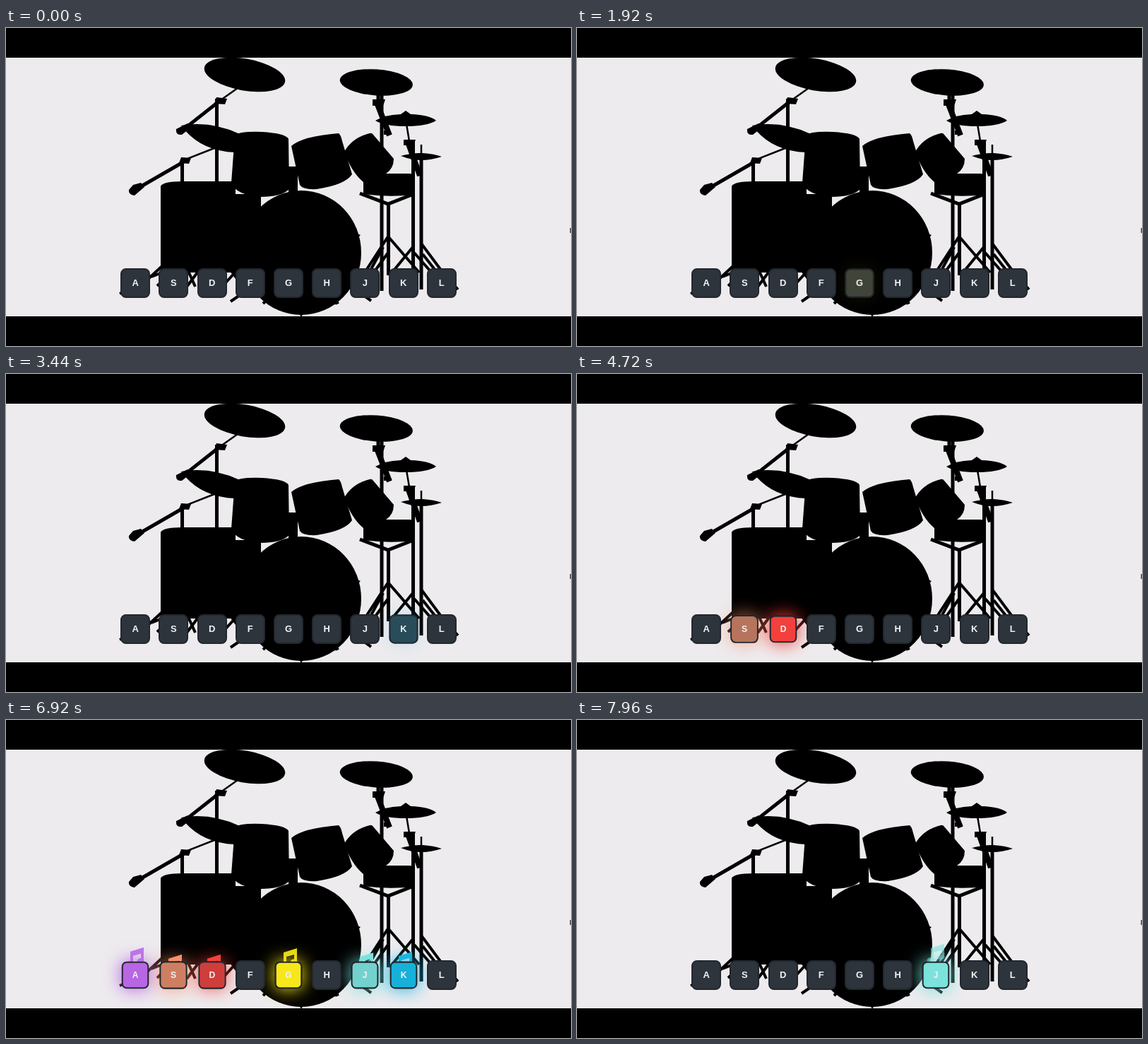
An HTML page for the animation above (8000 ms loop, 800 px wide and 450 px high).

```html
<!DOCTYPE html>
<html lang="en">
<head>
<meta charset="utf-8">
<title>Drum keys</title>
<style>
  html, body { margin: 0; width: 100%; height: 100%; overflow: hidden; background: #000; }
  #stage { position: absolute; left: 0; top: 0; width: 800px; height: 450px; overflow: hidden; background: #edebee; }
  #kit { position: absolute; left: 0; top: 0; }
  .bar { position: absolute; left: 0; width: 800px; height: 42px; background: #000; z-index: 2; }
  .key { position: absolute; top: 340px; width: 42px; height: 42px; }
  .glow, .cap, .tint { position: absolute; inset: 0; border-radius: 8px; box-sizing: border-box; }
  .glow { opacity: var(--on); box-shadow: 0 0 27px 1px var(--c); transform: scale(.92); }
  .note { position: absolute; left: 8px; top: 0; fill: var(--c); opacity: var(--note); transform: translateY(var(--y)); }
  .cap { z-index: 1; overflow: hidden; background: #2d343c; border: 2px solid #22272f;
    transform: scale(calc(1 - .08 * var(--on)));
    font: bold 13px/38px "Liberation Sans", Arial, sans-serif; text-align: center; color: #f2f2f2; }
  .tint { border-radius: 6px; background: var(--c); opacity: var(--on); }
  .cap span { position: relative; }
</style>
</head>
<body>
<div id="stage">
  <svg id="kit" width="800" height="450" viewBox="0 0 800 450">
    <!-- cymbals -->
    <ellipse cx="338" cy="66" rx="58" ry="22.5" transform="rotate(10 338 66)"/>
    <ellipse cx="524.3" cy="77" rx="51.7" ry="18.5" transform="rotate(4 524 77)"/>
    <path d="M523 131Q535 123 559 122L566 117L573 122Q600 123 609 131Q596 139 566 139T523 131Z"/>
    <path d="M559 181Q575 177 586 177H590Q606 178 617 182Q602 187 588 187T559 181Z"/>
    <path d="M248 138Q290 131 331 150L324 176Q274 174 248 138Z"/>
    <!-- toms, snare and bass drum -->
    <path d="M324 152Q330 146 362 147Q396 149 400 157L401 228Q390 239 360 239Q325 236 319 219Z"/>
    <path d="M404 167Q420 153 471 149Q474 151 476 160L490 207Q480 222 440 228Q420 229 416 222Z"/>
    <path d="M479 175Q490 155 515 149Q518 148 520 151L549 185Q549 199 538 206H572Q578 207 578 211V236Q540 240 506 235V218Q489 204 479 175Z"/>
    <path d="M219 224Q222 217 250 217H325V235H361V346H219Z"/>
    <ellipse cx="418" cy="318" rx="85" ry="88"/>
    <path d="M400 196H413V235H400ZM497 291L502 293L499 296ZM415 404H421L418 409Z"/>
    <!-- clamps and counterweights -->
    <path d="M298 98L313 100L310 108L295 107ZM248 183L262 184L259 192L245 191ZM519 101H537L534 110H519ZM563 158H580L577 166H563ZM535 145H543V151H535Z"/>
    <path d="M241 143L257 135L263 140L249 151Q240 152 241 143ZM174 229L180 222L191 219L196 225L182 237Q173 236 174 229Z"/>
    <g fill="none" stroke="#000">
      <path stroke-width="5" d="M298.500 100V220M249.500 188V220M532 92V372M576.500 160V370M588 184V370"/>
      <path stroke-width="2.500" d="M328 85L304 102M295 170L254 186M588 165V184M567 136L571 160"/>
      <path stroke-width="5" d="M304 102L252 143M254 188L188 226M527 88V102"/>
      <path stroke-width="8" d="M526 108L543 152M570 164L586 209"/>
      <path stroke-width="5" d="M501 234L541 249L577 235M541.500 248V350"/>
      <path stroke-width="4" d="M541 295L504 352M541 295L585 346M541 318L520 347M534 310L500 372M576 310L545 348M588 305L620 348L640 370M590 320L612 348M578 318L606 350"/>
      <path stroke-width="4" d="M222 336L196 360L161 376M226 344L206 352M236 344L214 365M258 344L268 366M274 342L256 366M318 342L334 364M326 344L306 366M334 376L318 387M500 374L517 386M368 386L364 390M466 390L471 388"/>
    </g>
    <rect x="798.500" y="283" width="1.500" height="7" fill="#444"/>
  </svg>
  <div class="bar" style="top:0"></div>
  <div class="bar" style="top:408px"></div>
</div>
<script>
  const LOOP = 8000;
  const COLORS = {
    A: '#b866e4', S: '#f5916a', D: '#f5403c', F: '#f59a23', G: '#f7e71a',
    H: '#76dd78', J: '#7be2dc', K: '#16b6e0', L: '#ee6fae'
  };
  // Each line: key, then the times it is struck.
  const SCORE = `
    A 40 3560 6260 6800 7160
    S 180 840 3600 4490 6400 6840 7140 7650
    D 400 1080 1940 2500 3700 4060 4520 5330 5860 6840 7300
    G 540 1630 2260 2640 3860 4860 5560 6500 6805 7440
    H 1300 2140 2860 3900 5640 7560
    J 300 2960 3740 4940 5420 6830 7820
    K 40 3160 4060 4780 5700 6560 6825 7180
    L 3480`;

  const hits = {};
  for (const line of SCORE.trim().split('\n')) {
    const [name, ...times] = line.trim().split(' ');
    hits[name] = times.map(Number);
  }

  const clamp = v => Math.max(0, Math.min(1, v));
  const NOTE = `<svg class="note" width="26" height="27" viewBox="0 0 26 27">
    <path d="M6 6L25 0V19H21V9L10 12V23H6Z"/>
    <ellipse cx="5.500" cy="23" rx="5" ry="3.600" transform="rotate(-15 5.500 23)"/>
    <ellipse cx="20.500" cy="19" rx="5" ry="3.600" transform="rotate(-15 20.500 19)"/></svg>`;

  const stage = document.getElementById('stage');
  const keys = Object.keys(COLORS).map((name, i) => {
    const el = document.createElement('div');
    el.className = 'key';
    el.style.left = 162.2 + 54.2 * i + 'px';
    el.style.setProperty('--c', COLORS[name]);
    el.innerHTML = `<div class="glow"></div>${NOTE}
      <div class="cap"><div class="tint"></div><span>${name}</span></div>`;
    stage.append(el);
    return { el, times: hits[name] || [] };
  });

  function draw(now) {
    const t = now % LOOP;
    for (const { el, times } of keys) {
      let on = 0, note = 0, y = 0;
      for (const start of times) {
        const age = t - start;
        if (age < 0 || age >= 300) continue;
        on = Math.max(on, Math.min(clamp(age / 100), clamp((300 - age) / 100)));
        note = clamp(age / 30) * clamp((190 - age) / 80);
        y = 12 - age * 0.25;
      }
      el.style.setProperty('--on', on);
      el.style.setProperty('--note', note);
      el.style.setProperty('--y', y + 'px');
    }
  }

  const begin = performance.now();
  function tick() {
    draw(performance.now() - begin);
    requestAnimationFrame(tick);
  }
  tick();
</script>
</body>
</html>
```
